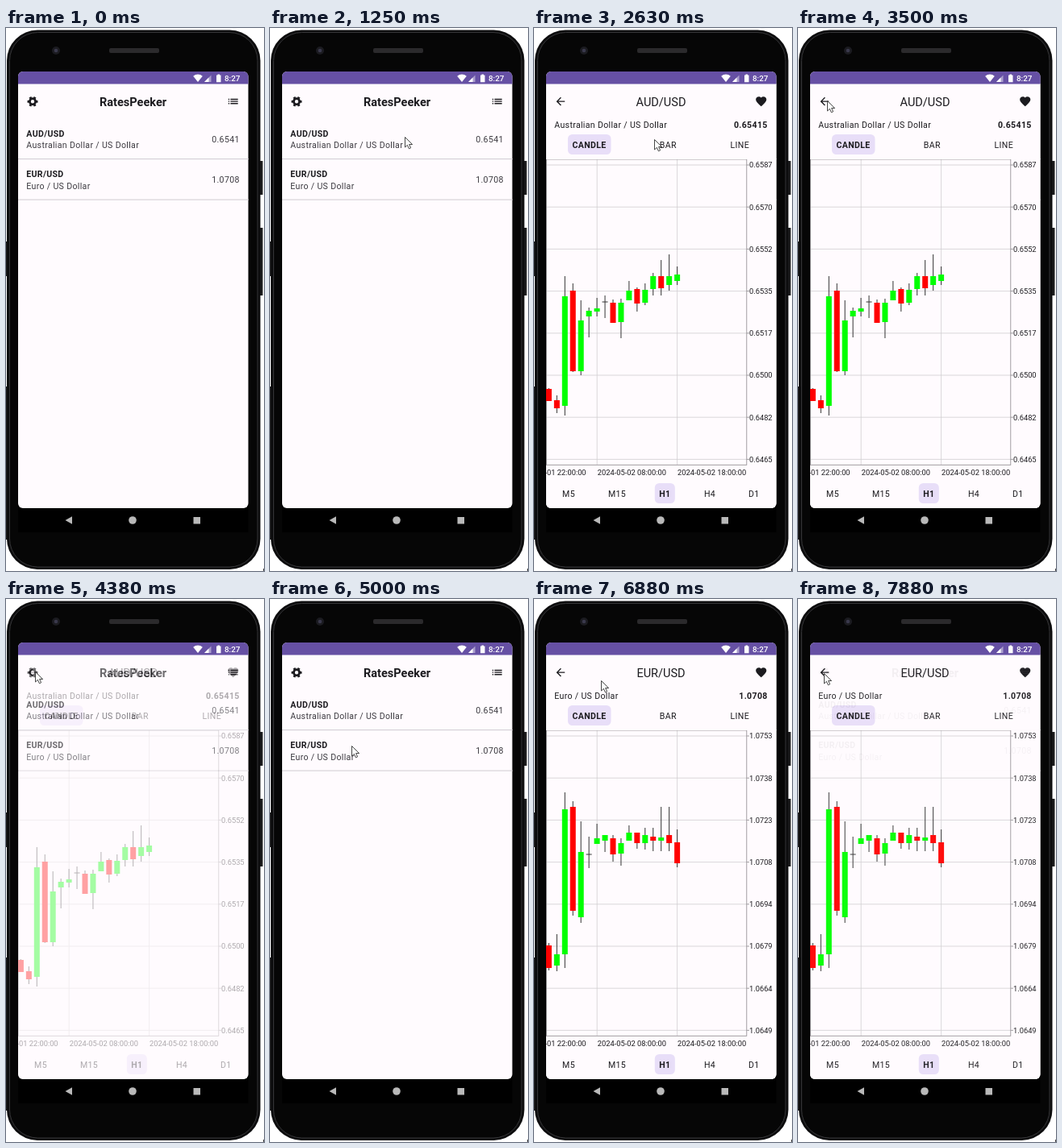
An HTML page that plays this animation: 320x674 px, repeating every 8 s.

```html
<!DOCTYPE html>
<html lang="en">
<head>
<meta charset="utf-8">
<title>Currency rates app</title>
<style>
html, body { margin: 0; width: 100%; height: 100%; overflow: hidden; background: #fff; }
svg { display: block; width: 100%; height: 100%; }
text { font: 10.57px Roboto, sans-serif; letter-spacing: .33px; fill: #1c1b1f; }
.bold { font-weight: 700; }
.soft { fill: #3c3a40; }
.title { font-size: 14.54px; letter-spacing: 0; }
.axis { font-size: 9.3px; letter-spacing: 0; }
.clock { font-size: 9.9px; font-weight: 500; letter-spacing: 0; fill: #fff; }
.mid { text-anchor: middle; }
.end { text-anchor: end; }
.icon { fill: #1c1b1f; }
.pill { fill: #e8def8; }
.grid { stroke: #d0ced1; stroke-width: .8; fill: none; }
.frame { stroke: #8a888b; stroke-width: .8; fill: none; }
.rule { stroke: #cfcbd1; stroke-width: 1; }
.wick { stroke: #333; stroke-width: 1; }

.aud, .eur, .press, .grow, .loaded, .loading, #cursor { animation: 8s step-end infinite; }
.aud { animation-name: aud; }
.eur { animation-name: eur; }
.aud .loaded { animation-name: aud-loaded; }
.eur .loaded { animation-name: eur-loaded; }
.aud .loading { animation-name: aud-loading; }
.eur .loading { animation-name: eur-loading; }
.press.first { animation-name: press-first; }
.press.second { animation-name: press-second; }
.grow { animation-name: grow; }
#cursor { animation-name: cursor; }
.spin { transform-origin: 157.5px 356px; animation: spin 8s steps(64) infinite; }

@keyframes spin { to { transform: rotate(2880deg); } }
@keyframes aud {
  0% { opacity: 0; } 25% { opacity: .02; } 26.5625% { opacity: .1; }
  29.6875% { opacity: .85; } 31.25% { opacity: .96; } 32.8125% { opacity: 1; }
  54.6875% { opacity: .36; } 56.25% { opacity: .13; } 57.8125% { opacity: .04; }
  59.375%, 100% { opacity: 0; }
}
@keyframes eur {
  0% { opacity: 0; } 71.875% { opacity: .42; } 73.4375% { opacity: .76; }
  75% { opacity: .92; } 76.5625% { opacity: .98; } 78.125% { opacity: 1; }
  96.875% { opacity: .99; } 98.4375%, 100% { opacity: .95; }
}
@keyframes aud-loaded { 0% { opacity: 0; } 31.25%, 100% { opacity: 1; } }
@keyframes eur-loaded { 0% { opacity: 0; } 78.125%, 100% { opacity: 1; } }
@keyframes aud-loading { 0% { opacity: 1; } 31.25%, 100% { opacity: 0; } }
@keyframes eur-loading { 0% { opacity: 1; } 78.125%, 100% { opacity: 0; } }
@keyframes press-first { 0% { opacity: 0; } 25% { opacity: 1; } 32.8125%, 100% { opacity: 0; } }
@keyframes press-second { 0% { opacity: 0; } 71.875% { opacity: 1; } 78.125%, 100% { opacity: 0; } }
@keyframes grow { 0% { r: 60px; } 26.5625% { r: 160px; } 35% { r: 46px; } 73.4375%, 100% { r: 160px; } }
@keyframes cursor {
  0% { transform: translate(340px, 105px); }
  9.375% { transform: translate(311px, 106px); }
  10.9375% { transform: translate(270px, 114px); }
  12.5% { transform: translate(226px, 123px); }
  14.0625% { transform: translate(191px, 130px); }
  15.625% { transform: translate(167px, 135px); }
  17.1875% { transform: translate(153px, 138px); }
  18.75% { transform: translate(149px, 138px); }
  37.5% { transform: translate(140px, 133px); }
  39.0625% { transform: translate(108px, 117px); }
  40.625% { transform: translate(68px, 101px); }
  42.1875% { transform: translate(43px, 92px); }
  43.75% { transform: translate(36px, 90px); }
  57.8125% { transform: translate(42px, 101px); }
  59.375% { transform: translate(62px, 128px); }
  60.9375% { transform: translate(85px, 160px); }
  62.5% { transform: translate(101px, 182px); }
  64.0625% { transform: translate(109px, 190px); }
  65.625% { transform: translate(115px, 191px); }
  67.1875% { transform: translate(119px, 191px); }
  82.8125% { transform: translate(115px, 174px); }
  84.375% { transform: translate(101px, 135px); }
  85.9375% { transform: translate(83px, 101px); }
  87.5% { transform: translate(48px, 93px); }
  89.0625%, 100% { transform: translate(32px, 92px); }
}
</style>
</head>
<body>
<svg viewBox="0 0 320 674">
  <defs>
    <clipPath id="screen"><rect x="15" y="54" width="285.5" height="542" rx="6"/></clipPath>
    <clipPath id="row1"><rect x="15" y="113" width="285.5" height="49.5"/></clipPath>
    <clipPath id="row2"><rect x="15" y="163" width="285.5" height="50"/></clipPath>
    <clipPath id="plot"><rect x="15" y="163" width="286" height="400"/></clipPath>
  </defs>

  <g id="phone">
    <path fill="#1b1b1c" d="M314 165h4.500v42h-4.500zM314 248h4.500v84h-4.500zM0 265h3v43h-3zM0 445h2v190h-2z"/>
    <rect x="1" y="2.500" width="314.500" height="669.500" rx="38" fill="#0d0d0e"/>
    <rect x="4.500" y="5.500" width="307.500" height="663.500" rx="35" fill="#060606" stroke="#353537"/>
    <rect x="128" y="25" width="62" height="6" rx="2" fill="#2b2a2c"/>
    <circle cx="62" cy="28" r="5" fill="#1b1b20"/>
    <circle cx="62" cy="28" r="2.300" fill="#3a394c"/>
    <rect x="15" y="590" width="285.500" height="36" fill="#000"/>
    <g fill="#b9b9b9">
      <path d="M73.500 611l8.500-4.800v9.600z"/>
      <circle cx="157" cy="611" r="4.800"/>
      <rect x="232.500" y="607" width="8.500" height="8.500"/>
    </g>
    <rect x="319" y="671" width="1" height="3" fill="#444"/>
  </g>

  <g clip-path="url(#screen)">
    <rect x="15" y="54" width="286" height="542" fill="#fffbfe"/>
    <g id="list"></g>
    <g id="details"></g>
    <rect x="15" y="54" width="286" height="15.500" fill="#6650a4"/>
    <g fill="#fff">
      <path d="M238 67l-5.800-7.300a9 9 0 0 1 11.600 0z"/>
      <path d="M246 67h8.500v-8.500z" opacity=".45"/>
      <path d="M246 67h5.500v-5.500z"/>
      <path d="M261 58.500h1.500v-1h2.500v1h1.500v8.700h-5.500z"/>
    </g>
    <text class="clock" x="271" y="65.800">8:27</text>
  </g>

  <path id="cursor" d="M.5.5v12.500l2.900-2.700 2 4.500 2.200-1-2-4.300h4z" fill="#fff" stroke="#333" stroke-width=".9"/>
</svg>

<script>
const text = (x, y, str, cls = "") => `<text x="${x}" y="${y}" class="${cls}">${str}</text>`;
const line = (x1, y1, x2, y2, cls) =>
  `<line x1="${x1}" y1="${y1}" x2="${x2}" y2="${y2}" class="${cls}"/>`;
const icon = (x, y, d) => `<path class="icon" transform="translate(${x} ${y}) scale(.661)" d="${d}"/>`;

const ARROW = "M20 11H7.83l5.590-5.590L12 4l-8 8 8 8 1.410-1.410L7.830 13H20z";
const HEART = "M12 21.350l-1.450-1.320C5.400 15.360 2 12.280 2 8.500 2 5.420 4.420 3 7.500 3c1.740 0 3.410.810 4.500 2.090C13.090 3.810 14.760 3 16.500 3 19.580 3 22 5.420 22 8.500c0 3.780-3.400 6.860-8.550 11.540z";
const BULLETS = "M3 13h2v-2H3zm0 4h2v-2H3zm0-8h2V7H3zm4 4h14v-2H7zm0 4h14v-2H7zM7 7v2h14V7z";

// Candles hold screen heights: open, close, high, low.
const pairs = [
  {
    id: "aud", symbol: "AUD/USD", name: "Australian Dollar / US Dollar",
    rate: "0.6541", price: "0.65415", top: 0.65872, step: 0.00175,
    candles: [
      [448, 463, 447, 463], [462, 472, 456, 478], [469, 333, 308, 481], [326, 426, 317, 427],
      [426, 363, 338, 431], [358, 351, 347, 384], [352, 348, 335, 358], [340, 340, 332, 360],
      [341, 366, 337, 366], [365, 341, 336, 385], [338, 326, 314, 338], [324, 342, 322, 352],
      [341, 325, 317, 344], [324, 308, 304, 332], [308, 323, 288, 332], [319, 308, 281, 326],
      [314, 306, 296, 319]
    ]
  },
  {
    id: "eur", symbol: "EUR/USD", name: "Euro / US Dollar",
    rate: "1.0708", price: "1.0708", top: 1.07528, step: 0.001481,
    candles: [
      [430, 458, 427, 461], [455, 441, 416, 462], [441, 261, 240, 458], [258, 387, 251, 393],
      [395, 314, 276, 402], [317, 317, 295, 334], [304, 297, 279, 304], [300, 293, 293, 314],
      [297, 317, 293, 326], [316, 303, 297, 331], [300, 290, 281, 300], [290, 303, 290, 310],
      [303, 293, 284, 311], [295, 300, 284, 313], [300, 296, 258, 313], [293, 303, 258, 313],
      [302, 328, 286, 333]
    ]
  }
];

function candle([open, close, high, low], i) {
  const x = 18.4 + 9.95 * i;
  const wick = line(x, high, x, low, "wick");
  if (open === close) return wick + line(x - 3.5, open, x + 3.5, open, "wick");
  const fill = close < open ? "#0f0" : "#f00";
  return wick + `<rect x="${x - 3.5}" y="${Math.min(open, close)}" width="7"
    height="${Math.abs(close - open)}" fill="${fill}"/>`;
}

function chart({ top, step, candles }) {
  let out = line(78.2, 163, 78.2, 542, "grid") + line(177.6, 163, 177.6, 542, "grid");
  for (let i = 0; i < 8; i++) {
    const y = 170 + 52.2 * i;
    out += line(15, y, 264, y, "grid") + line(264, y, 267, y, "frame")
      + text(267, y + 3.3, (top - step * i).toFixed(4), "axis");
  }
  out += `<rect class="frame" x="15.4" y="163" width="248.4" height="379.3"/>`;
  ["01 22", "02 08", "02 18"].forEach((hour, i) => {
    out += text(-20.5 + 99.3 * i, 555.4, `2024-05-${hour}:00:00`, "axis");
  });
  return `<g clip-path="url(#plot)">${out}${candles.map(candle).join("")}</g>`;
}

function tabs(labels, centers, y, chosen) {
  return labels.map((label, i) =>
    text(centers[i], y, label, i === chosen ? "mid bold" : "mid")).join("");
}

function detail(pair) {
  return `<g class="${pair.id}">
    <rect x="15" y="69" width="286" height="527" fill="#fffbfe"/>
    ${icon(25, 83.2, ARROW)}${icon(273.8, 83.2, HEART)}
    ${text(157.5, 97, pair.symbol, "title mid")}
    <g class="loading"><circle class="spin" cx="157.5" cy="356" r="20" fill="none" stroke="#6650a4"
      stroke-width="2.6" pathLength="360" stroke-dasharray="128 232" stroke-dashoffset="-39"/></g>
    <g class="loaded">
      ${text(25.3, 123.8, pair.name)}${text(289.7, 123.8, pair.price, "bold end")}
      <rect class="pill" x="42" y="132" width="53.500" height="25" rx="5.500"/>
      ${tabs(["CANDLE", "BAR", "LINE"], [68.6, 166.3, 255.3], 149, 0)}
      ${chart(pair)}
      <rect class="pill" x="149.800" y="565" width="25" height="25" rx="5.500"/>
      ${tabs(["M5", "M15", "H1", "H4", "D1"], [43, 103, 162.3, 218, 272.7], 581.7, 2)}
    </g>
  </g>`;
}

function row({ symbol, name, rate }, i) {
  const y = 50.5 * i;
  return text(25.3, 134.8 + y, symbol, "bold") + text(25.3, 149 + y, name, "soft")
    + text(289.7, 141.8 + y, rate, "end soft") + line(15, 162.6 + y, 301, 162.6 + y, "rule");
}

function press(order, clip, x, y) {
  return `<g class="press ${order}" clip-path="url(#${clip})">
    <rect x="15" y="113" width="286" height="101" fill="#1c1b1f" opacity=".08"/>
    <circle class="grow" cx="${x}" cy="${y}" r="60" fill="#1c1b1f" opacity=".045"/>
  </g>`;
}

const gear = `<g fill="none" stroke="#1c1b1f">
  <circle cx="33" cy="91.3" r="3.6" stroke-width="2.8"/>
  <circle cx="33" cy="91.3" r="5.2" stroke-width="2.6" pathLength="12" stroke-dasharray="1 1" stroke-dashoffset=".5"/>
</g>`;

document.getElementById("list").innerHTML =
  gear + icon(273.8, 83.2, BULLETS) + text(157.5, 97, "RatesPeeker", "title bold mid")
  + press("first", "row1", 151, 138) + press("second", "row2", 129, 188)
  + pairs.map(row).join("");
document.getElementById("details").innerHTML = pairs.map(detail).join("");
</script>
</body>
</html>
```
